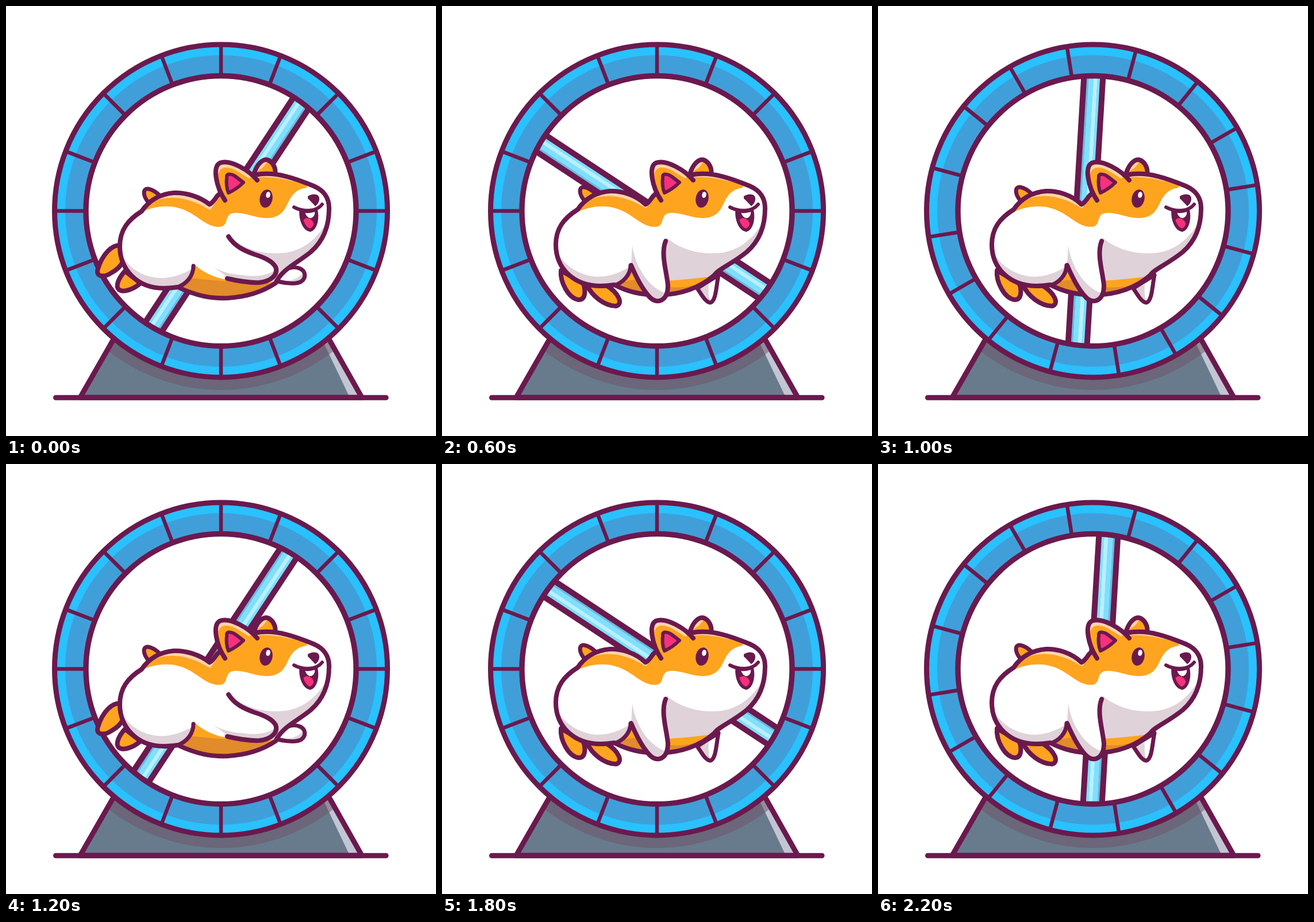
Write an HTML page with a canvas that moves like this. It is 748 by 748 pixels and loops after 2.4 s.

```html
<!DOCTYPE html>
<html lang="en">
<head>
<meta charset="utf-8">
<title>Hamster wheel</title>
<style>
  html, body { margin: 0; width: 100%; height: 100%; overflow: hidden; background: #fff; }
  canvas { display: block; width: 748px; height: 748px; }
</style>
</head>
<body>
<canvas id="stage" width="748" height="748"></canvas>
<script>
const ctx = document.getElementById('stage').getContext('2d');
const LOOP = 2400, STEP = 200;
const CX = 374, CY = 356.5;
const INK = '#6b194e', ORANGE = '#ffa41f', BROWN = '#e18b2b', PEACH = '#ffd3aa';
const WHITE = '#fff', SHADE = '#dfd2d8', PINK = '#f7317b';

function shape(d, fill, line = 8) {
  const p = new Path2D(d);
  if (fill) {
    ctx.fillStyle = fill;
    ctx.fill(p);
  }
  if (line) {
    ctx.strokeStyle = INK;
    ctx.lineWidth = line;
    ctx.stroke(p);
  }
}
const patch = (d, fill) => shape(d, fill, 0);
const line = (d, width) => shape(d, null, width);

function clipped(d, draw) {
  ctx.save();
  ctx.clip(new Path2D(d));
  draw();
  ctx.restore();
}

function raised(lift, draw) {
  ctx.save();
  ctx.translate(0, -lift);
  draw();
  ctx.restore();
}

function disc(r, fill, y = CY) {
  ctx.beginPath();
  ctx.arc(CX, y, r, 0, Math.PI * 2);
  ctx.fillStyle = fill;
  ctx.fill();
}

function oval(x, y, rx, ry, turn, fill) {
  ctx.beginPath();
  ctx.ellipse(x, y, rx, ry, turn, 0, Math.PI * 2);
  ctx.fillStyle = fill;
  ctx.fill();
}

function drawBase() {
  const base = 'M188 578L129 681H619L561 578Z';
  clipped(base, () => {
    patch(base, '#687b8c');
    patch('M545 570L598 681H619L561 570Z', '#c1c6d2');
    ctx.globalAlpha = 0.5;
    disc(317, '#6e526b', 351);
    ctx.globalAlpha = 1;
  });
  line(base, 9);
  line('M86.500 681.200H661', 9);
}

function drawBar(turn) {
  ctx.save();
  ctx.translate(CX, CY);
  ctx.rotate(turn + 33.4 * Math.PI / 180);
  const left = -3.5, width = 33;
  const bands = [['#7fdfff', 0, 0.3], ['#b9f0ff', 0.3, 0.18], ['#7fdfff', 0.48, 0.26], ['#69bbdf', 0.74, 0.26]];
  for (const [color, at, size] of bands) {
    ctx.fillStyle = color;
    ctx.fillRect(left + at * width, -233, size * width, 466);
  }
  line(`M${left} -232V232M${left + width} -232V232`, 10);
  ctx.restore();
}

function drawRim(turn) {
  const band = (r, w, color) => {
    ctx.beginPath();
    ctx.arc(CX, CY, r, 0, Math.PI * 2);
    ctx.strokeStyle = color;
    ctx.lineWidth = w;
    ctx.stroke();
  };
  band(262, 50, '#29c1ff');
  band(253, 36, '#409fd9');
  ctx.save();
  ctx.translate(CX, CY);
  ctx.rotate(turn);
  for (let quarter = 0; quarter < 4; quarter++) {
    for (const deg of [0, 21, 45, 69]) {
      ctx.save();
      ctx.rotate((quarter * 90 + deg) * Math.PI / 180);
      line('M0 -237V-287', 6.5);
      ctx.restore();
    }
  }
  ctx.restore();
  band(289.5, 9, INK);
  band(235, 9.4, INK);
}

const back = lift => `M354 345C336 ${331 - lift} 311 ${324 - lift} 292 ${325 - lift}` +
  `C268 ${327 - lift} 249 ${338 - lift} 236 ${357 - lift}C212 ${372 - lift} 198 ${390 - lift} 198 ${418 - lift}`;
const FACE = 'C480 458 504 449 530 428C552 409 562 382 562 352C562 331 551 320 535 313C508 302 468 286 433 294';
const HEAD_JOIN = 'C410 298 377 320 367 331C363 337 359 343 354 345Z';
const POSES = [
  {
    lift: 0,
    body: back(0) + 'C198 456 226 491 275 491C284 491 291 490 299 489C333 505 357 509 386 508C420 506 448 496 469 482' + FACE,
    belly: 'M328 450C350 470 380 478 410 479L480 480L450 530H290Z',
    bellyShade: 'M300 472C325 472 350 478 400 479L468 483L450 530H290Z',
    rumpShade: 'M195 420C210 461 250 478 284 472C302 469 314 463 326 456C325 475 315 488 299 489L270 500H220Z',
    rump: 'M299 489C314 483 326 470 326 452',
    legs: [
      'M203 417C184 412 167 434 160 457C155 472 171 472 182 465C193 459 201 451 204 443Z',
      'M207 461C196 473 190 487 196 493C204 500 223 492 234 482Z'
    ],
    hand: 'M469 478C484 482 505 485 514 479C522 473 522 462 512 457C502 452 489 456 479 462Z',
    handShade: 'M475 478C493 479 506 477 517 464C524 476 510 482 498 481Z',
    arm: 'M387 401C398 418 413 425 432 432C448 437 463 443 469 454C474 467 461 479 441 481C421 482 402 478 385 473L358 452L365 400Z',
    armShade: 'M360 453C373 462 391 467 411 468C435 472 454 469 469 459C470 474 451 480 437 479C416 480 398 477 384 471Z',
    armLine: 'M387 401C398 418 413 425 432 432C448 437 463 443 469 454C474 467 461 479 441 481C421 482 402 478 385 474'
  },
  {
    lift: 3,
    body: back(3) + 'C198 456 229 487 276 487C285 487 293 486 300 485C324 498 347 502 376 503C417 502 449 490 474 468' + FACE,
    belly: 'M328 450L340 475C378 482 425 476 480 469L450 530H290Z',
    bellyShade: 'M300 487C322 475 339 474 355 480C397 494 430 492 460 478L450 530H290Z',
    rumpShade: 'M195 417C210 456 250 475 284 470C302 467 314 461 326 454C325 471 315 484 300 486L270 500H220Z',
    rump: 'M300 486C315 481 328 468 328 451',
    legs: [
      'M207 460C205 480 220 509 238 511C250 511 250 495 246 483Z',
      'M252 485C261 505 283 522 303 522C316 518 307 499 286 486Z'
    ],
    hand: 'M444 491C452 503 459 516 467 516C477 513 477 486 481 468Z',
    handShade: 'M447 492L464 484C463 497 464 508 467 516C458 512 453 501 447 492Z',
    arm: 'M389 409C380 431 391 463 393 486C393 513 374 521 360 505C346 489 337 470 329 451L332 412Z',
    armShade: 'M331 416C335 450 358 490 390 500C382 518 368 512 360 505C347 490 338 470 329 451Z',
    armLine: 'M389 409C380 431 391 463 393 486C393 513 374 521 360 505C346 489 337 470 329 451'
  }
];

function drawBody(pose) {
  const body = pose.body + HEAD_JOIN;
  clipped(body, () => {
    patch(body, WHITE);
    patch('M391 403C414 424 452 434 488 429C523 423 548 399 565 362L570 440L470 500H380V440Z', SHADE);
    patch(pose.belly, ORANGE);
    patch(pose.bellyShade, BROWN);
    patch(pose.rumpShade, SHADE);
    patch('M230 361C262 345 292 345 317 358C337 368 352 386 373 384C387 382 380 366 392 361C412 355 441 375 467 367C497 358 484 322 523 316L530 280H230Z', ORANGE);
    raised(pose.lift, () => patch('M256 340C290 326 324 336 355 355L376 326L354 340L300 315Z', PEACH));
    patch('M425 300C452 294 480 300 508 307L515 285H420Z', PEACH);
  });
  line(body);
  line(pose.rump, 7);
}

function drawEar() {
  const ear = 'M381 338C365 314 359 280 372 273C390 266 423 286 437 303L410 333Z';
  clipped(ear, () => {
    patch(ear, ORANGE);
    patch('M368 300C369 281 380 276 400 286L423 300L431 294L380 263L361 278Z', PEACH);
  });
  line('M381 338C365 314 359 280 372 273C390 266 423 286 437 303');
  shape('M384 298C383 290 393 292 400 297L413 307C405 315 396 321 387 325C383 316 383 307 384 298Z', PINK, 6);
}

function drawFace() {
  oval(452.500, 335, 11, 16, 0.2, INK);
  oval(456, 328.500, 3.7, 5.3, 0.2, WHITE);
  patch('M525 331C531 327 540 326 544 331C547 337 543 345 538 348C534 344 529 338 525 335Z', INK);

  const mouth = 'M513 356C512 373 519 388 529 390C539 387 543 369 539 354C531 358 521 358 513 356Z';
  clipped(mouth, () => {
    patch(mouth, INK);
    patch('M519 354H538C538 363 535 368 530 369C525 369 520 363 519 354Z', WHITE);
    oval(525, 381, 10.5, 12, -0.3, PINK);
  });
  line(mouth, 5.5);
  line('M501 350C516 358 539 359 550 345', 6);
}

function drawHamster(pose) {
  raised(pose.lift, () => shape('M249 343C237 330 238 317 247 318C256 319 263 325 270 332Z', ORANGE, 7));
  for (const leg of pose.legs) shape(leg, ORANGE);
  shape('M431 293C436 276 447 264 456 268C465 272 470 283 468 293Z', ORANGE);
  patch('M437 288C441 277 448 271 454 272L447 281Z', PEACH);
  patch(pose.hand, WHITE);
  patch(pose.handShade, SHADE);
  line(pose.hand, 7);
  drawBody(pose);
  patch(pose.arm, WHITE);
  patch(pose.armShade, SHADE);
  line(pose.armLine);
  drawEar();
  drawFace();
}

function frame(now) {
  const step = Math.floor((now % LOOP) / STEP);
  const turn = step * STEP / LOOP * Math.PI * 2;
  ctx.fillStyle = WHITE;
  ctx.fillRect(0, 0, 748, 748);
  ctx.lineCap = ctx.lineJoin = 'round';
  drawBase();
  disc(289, WHITE);
  drawBar(turn);
  drawRim(turn);
  drawHamster(POSES[step % 2]);
}

const start = performance.now();
function tick() {
  frame(performance.now() - start);
  requestAnimationFrame(tick);
}
tick();
</script>
</body>
</html>
```
